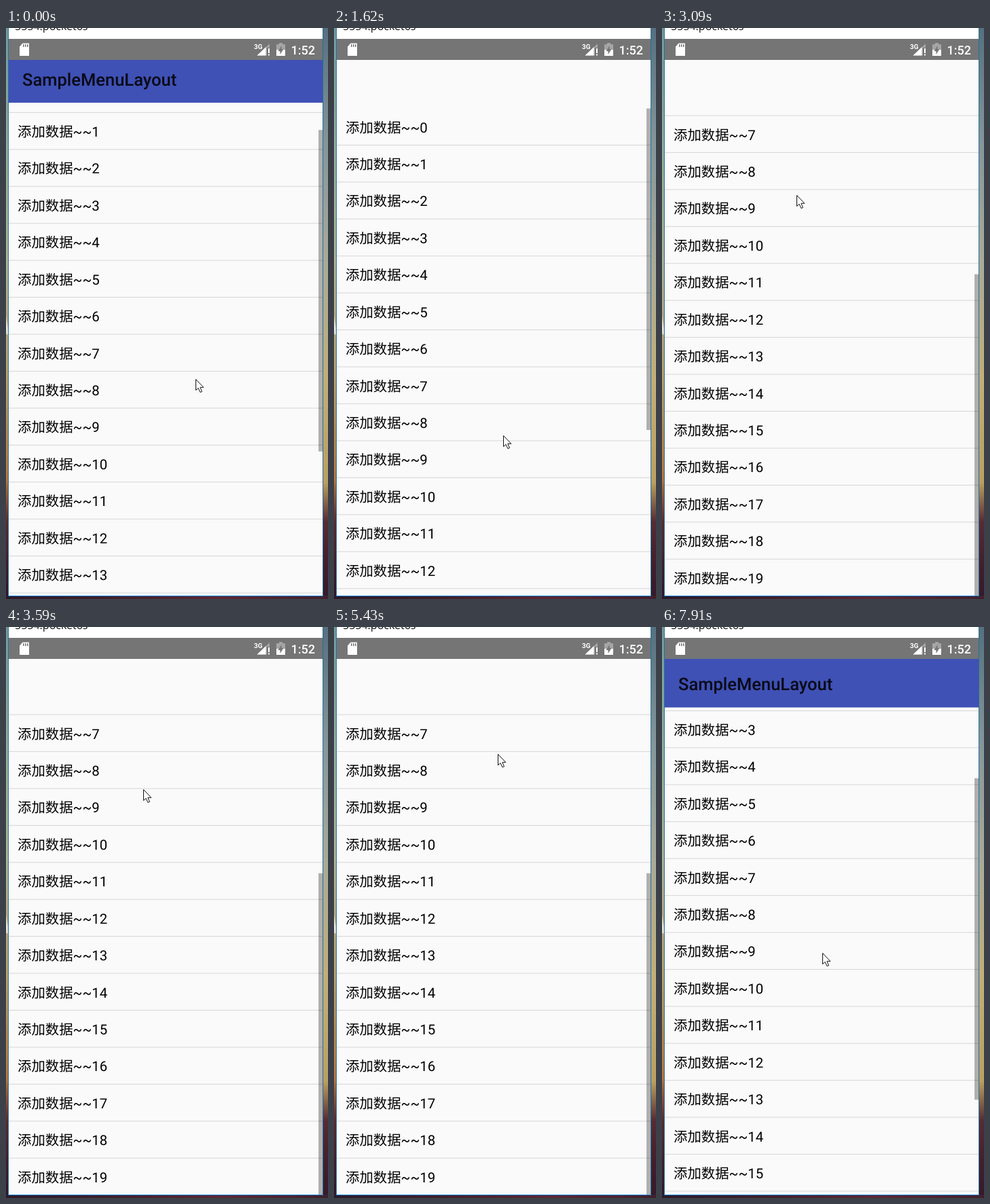
Animation, 474 px wide and 841 px high, one loop 8 s. Source, as an HTML page with a canvas:

```html
<!DOCTYPE html>
<html lang="zh">
<head>
<meta charset="utf-8">
<style>
html, body { margin: 0; width: 474px; height: 841px; overflow: hidden; background: #301c2b; }
canvas { display: block; }
</style>
</head>
<body>
<canvas id="stage" width="474" height="841"></canvas>
<script>
const ctx = document.getElementById('stage').getContext('2d');
ctx.textRendering = 'geometricPrecision';

const LOOP = 8000, TICK = 132, SLIDE = 300;
const LEFT = 4, WIDTH = 462, LIST_TOP = 118, BOTTOM = 836, ROW = 54.43, BAR = 71.5;

// The screen refreshes about every TICK ms inside these spans and rests between them
const bursts = [[120, 390], [660, 930], [1200, 2130], [2280, 2820], [3090, 3740],
  [4110, 5010], [5160, 5430], [5700, 6550], [6980, 7910]];

// Turning points of the drags
const drags = [
  { t: 0, scroll: 48, x: 279, y: 517 },
  { t: 930, scroll: 185, x: 262, y: 390 },
  { t: 1590, scroll: 0, x: 249, y: 600 },
  { t: 2130, scroll: 0, x: 245, y: 630 },
  { t: 3090, scroll: 370, x: 198, y: 246 },
  { t: 3740, scroll: 370, x: 204, y: 235 },
  { t: 4495, scroll: 160.8, x: 232, y: 376 },
  { t: 5010, scroll: 95, x: 250, y: 460 },
  { t: 5430, scroll: 370, x: 241, y: 187 },
  { t: 6550, scroll: 186, x: 254, y: 392 },
  { t: 7910, scroll: 158, x: 236, y: 480 }
];

// The toolbar hides and shows by turns, starting with a hide
const toggles = [-67, 1620, 2270, 4396, 5120, 6000];

function lastRefresh(t) {
  const burst = bursts.findLast(([start]) => start <= t);
  if (!burst) return 0;
  const [start, end] = burst;
  const step = (end - start) / Math.round((end - start) / TICK);
  return Math.min(end, start + step * Math.floor((t - start) / step + 1e-6));
}

function dragAt(t) {
  const i = Math.max(1, drags.findIndex(d => d.t >= t - 1e-6));
  const a = drags[i - 1], b = drags[i], k = (t - a.t) / (b.t - a.t);
  const mix = key => a[key] + (b[key] - a[key]) * k;
  return { scroll: mix('scroll'), x: Math.round(mix('x')), y: Math.round(mix('y')) };
}

function toolbarShift(t) {
  const i = toggles.findLastIndex(start => start <= t);
  const p = Math.min(1, (t - toggles[i]) / SLIDE);
  const eased = (1 - Math.cos(Math.PI * p)) / 2;
  return -BAR * (i % 2 ? 1 - eased : eased);
}

function rect(x, y, w, h, color) {
  ctx.fillStyle = color;
  ctx.fillRect(x, y, w, h);
}

function text(str, x, y, font, color) {
  ctx.font = font + ', sans-serif';
  ctx.fillStyle = color;
  ctx.fillText(str, x, y);
}

function poly(points, color, outline) {
  ctx.beginPath();
  points.forEach(([x, y]) => ctx.lineTo(x, y));
  ctx.closePath();
  ctx.fillStyle = color;
  ctx.fill();
  if (outline) {
    ctx.strokeStyle = outline;
    ctx.stroke();
  }
}

function clipped(y, h, paint) {
  ctx.save();
  ctx.beginPath();
  ctx.rect(LEFT, y, WIDTH, h);
  ctx.clip();
  paint();
  ctx.restore();
}

// Evenly spaced colours along the longer side
function blend(x, y, w, h, colors) {
  const g = w > h ? ctx.createLinearGradient(x, 0, x + w, 0) : ctx.createLinearGradient(0, y, 0, y + h);
  colors.forEach((c, i) => g.addColorStop(i / (colors.length - 1), c));
  rect(x, y, w, h, g);
}

function backdrop() {
  blend(0, 0, 4, 690, ['#6f9a9c', '#8fac9c', '#a9b494', '#b5a06c', '#b07038']);
  blend(466, 0, 8, 690, ['#55707f', '#84969b', '#a8aa98', '#c0ae78', '#b89d60']);
  blend(0, 670, 4, 171, ['#a8703f', '#5a2a30', '#40202c', '#2c1a2a']);
  blend(466, 670, 8, 171, ['#b89d60', '#552c35', '#42202e', '#331a2c']);
  blend(0, 836, 474, 5, ['#2c1a2a', '#40202c', '#5a2833', '#40202e']);
  poly([[0, 424], [3, 442], [3, 452], [0, 450]], '#dde0d8');
  rect(LEFT - 1, 0, WIDTH + 2, BOTTOM + 1, '#2a6d96');
  rect(LEFT - 1, BOTTOM, WIDTH + 2, 1, '#1883d7');
  rect(LEFT, 0, WIDTH, BOTTOM, '#fafafa');
}

function statusBar() {
  const white = '#fff', faint = '#a5a5a5', gray = '#757575';
  rect(LEFT, 0, WIDTH, 16, white);
  text('5554:pocket6s', 13, 3, '16px "Open Sans"', '#111');
  rect(LEFT, 16, WIDTH, 31, gray);
  poly([[24.5, 22.5], [34, 22.5], [34, 41], [20, 41], [20, 27.5]], white);
  for (let i = 0; i < 3; i++) rect(25 + i * 3, 24, 1.5, 4, gray);
  text('3G', 365, 31, 'bold 10px Roboto', white);
  poly([[388, 23], [388, 29], [384, 29], [384, 40.5], [370, 40.5]], faint);
  poly([[382.5, 28], [382.5, 40.5], [369.5, 40.5]], white);
  rect(386, 30, 2, 7, white);
  rect(386, 38.5, 2, 2, white);
  rect(402, 22, 5, 2, faint);
  rect(398, 24, 13, 8, faint);
  rect(398, 32, 13, 9, white);
  poly([[405.5, 26], [405.5, 31], [408.5, 31], [403.5, 39], [403.5, 34], [400.5, 34]], gray);
  text('1:52', 419.5, 38.5, '500 18px Roboto', white);
}

function list(scroll) {
  clipped(LIST_TOP, BOTTOM - LIST_TOP, () => {
    for (let i = 0; i < 20; i++) {
      const y = LIST_TOP + i * ROW - scroll;
      text('添加数据~~' + i, 17, y + 35.5, '20.4px Roboto, "Noto Sans CJK SC"', '#000');
      rect(LEFT, y + ROW - .5, WIDTH, 1.1, '#d9d9d9');
    }
    rect(460, LIST_TOP + .5 + scroll * .66, 6, 473.5, 'rgba(0,0,0,.3)');
  });
}

function toolbar(shift) {
  clipped(47, BAR + 1, () => {
    rect(LEFT, 47 + shift, WIDTH, BAR, '#3f51b5');
    text('SampleMenuLayout', 24, 93 + shift, '500 25.5px Roboto', '#080a17');
  });
}

function pointer(x, y) {
  const shape = [[0, 0], [0, 16], [3.6, 12.8], [6.4, 19], [9, 18], [6.3, 11.8], [11.3, 11.8]];
  poly(shape.map(([dx, dy]) => [x + .5 + dx, y + .5 + dy]), '#fff', '#111');
}

function draw(now) {
  const t = lastRefresh(now % LOOP);
  const { scroll, x, y } = dragAt(t);
  backdrop();
  list(scroll);
  toolbar(toolbarShift(t));
  statusBar();
  pointer(x, y);
  requestAnimationFrame(draw);
}
requestAnimationFrame(draw);
</script>
</body>
</html>
```
